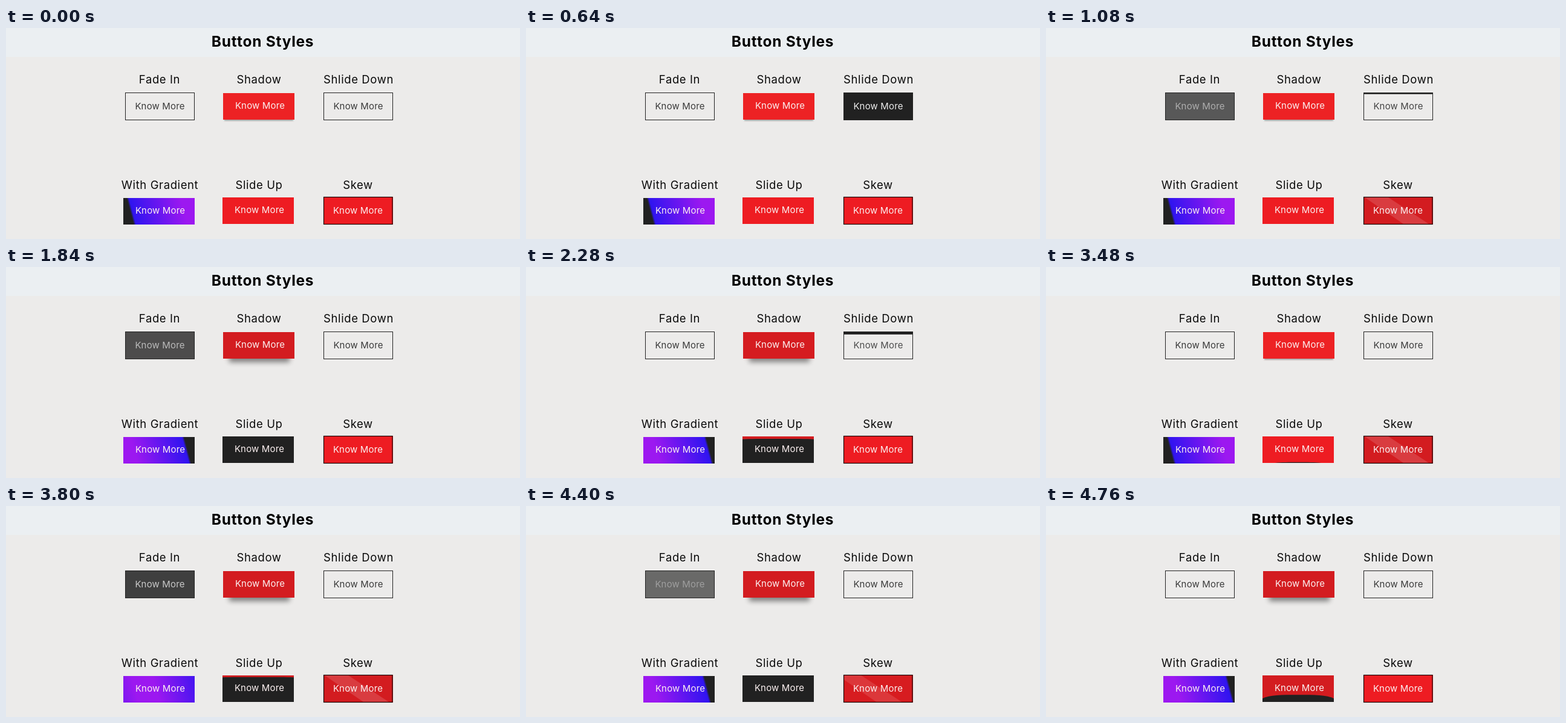
Animation of 850x350 px, one loop 4800 ms. Source, as an HTML page:

```html
<!DOCTYPE html>
<html lang="en">
<head>
<meta charset="utf-8">
<title>Button Styles</title>
<style>
html, body { margin: 0; width: 100%; height: 100%; overflow: hidden; background: #ecebea; }
svg { display: block; width: 850px; height: 350px; }
text { font-family: Inter, "Open Sans", sans-serif; text-anchor: middle; }
.title { font-size: 24.5px; font-weight: 700; letter-spacing: .7px; }
.label { font-size: 18.5px; font-weight: 400; letter-spacing: .6px; fill: #0a0a0a; }
.btn { font-size: 15px; letter-spacing: .15px; fill: #fbf0f0; }
.outline { fill: none; stroke: #222; stroke-width: 1; }
</style>
</head>
<body>
<svg viewBox="0 0 850 350">
  <defs>
    <linearGradient id="glow" gradientUnits="userSpaceOnUse" x1="196.4" y1="335" x2="427.6" y2="273">
      <stop offset=".07" stop-color="#212121"/>
      <stop offset=".085" stop-color="#3014f0"/>
      <stop offset=".43" stop-color="#9c18f0"/>
      <stop offset=".57" stop-color="#9c18f0"/>
      <stop offset=".915" stop-color="#3014f0"/>
      <stop offset=".93" stop-color="#212121"/>
    </linearGradient>
    <clipPath id="gradBox"><rect x="194" y="282" width="118" height="44"/></clipPath>
    <clipPath id="upBox"><rect x="358" y="281" width="118" height="44"/></clipPath>
    <clipPath id="skewBox"><rect x="526" y="281" width="113" height="44"/></clipPath>
    <filter id="soft" x="-20%" y="-60%" width="140%" height="220%"><feGaussianBlur stdDeviation="1.3"/></filter>
    <filter id="wide" x="-20%" y="-60%" width="140%" height="220%"><feGaussianBlur stdDeviation="4"/></filter>
  </defs>

  <rect width="850" height="350" fill="#ecebea"/>
  <rect width="850" height="48" fill="#ebeff2"/>
  <text class="title" x="424.5" y="31">Button Styles</text>

  <text class="label" x="254" y="92">Fade In</text>
  <rect id="fadeFill" x="197" y="107" width="115" height="46" fill="#212121"/>
  <rect class="outline" x="197.5" y="107.5" width="114" height="45"/>
  <text class="btn" id="fadeText" x="254.5" y="135">Know More</text>

  <text class="label" x="418.5" y="92">Shadow</text>
  <rect id="shadeLow" x="361" y="140" width="114" height="14" filter="url(#soft)"/>
  <rect id="shadeHigh" x="369" y="130" width="100" height="28" filter="url(#wide)"/>
  <rect id="shadowFill" x="359" y="108" width="118" height="44"/>
  <text class="btn" x="420" y="134">Know More</text>

  <text class="label" x="583" y="92">Shlide Down</text>
  <rect id="downFill" x="525" y="107" width="115" height="46" fill="#212121"/>
  <rect class="outline" x="525.5" y="107.5" width="114" height="45"/>
  <text class="btn" id="downText" x="582.5" y="135">Know More</text>

  <text class="label" x="254.5" y="267">With Gradient</text>
  <g clip-path="url(#gradBox)">
    <rect id="gradFill" x="194" y="282" width="236" height="44" fill="url(#glow)"/>
  </g>
  <text class="btn" x="255" y="308">Know More</text>

  <text class="label" x="418.5" y="267">Slide Up</text>
  <g clip-path="url(#upBox)">
    <rect id="upBase" x="358" y="281" width="118" height="44"/>
    <path id="upFill" fill="#212121"/>
  </g>
  <text class="btn" x="419" y="307">Know More</text>

  <text class="label" x="582" y="267">Skew</text>
  <rect id="skewFill" x="525" y="280" width="115" height="46"/>
  <g clip-path="url(#skewBox)">
    <path id="stripe" d="M527 281H566L633 325H591Z" fill="#fff"/>
  </g>
  <rect x="525.5" y="280.5" width="113.5" height="45" fill="none" stroke="#1c0505" stroke-width="1.2"/>
  <text class="btn" x="582" y="308">Know More</text>
</svg>
<script>
const LOOP = 4800;
const $ = id => document.getElementById(id);
const set = (id, attrs) => {
  for (const k in attrs) $(id).setAttribute(k, attrs[k]);
};

// Hover windows: rise start, rise end, fall start, fall end (ms)
const hovers = {
  fade: [[820, 1220, 1720, 2120], [3500, 3900, 4240, 4640]],
  shadow: [[1360, 1640, 2240, 2520], [3540, 3760, 4900, 5100]],
  down: [[40, 440, 740, 1140], [2200, 2600, 2860, 3260]],
  grad: [[1240, 1720, 2240, 2660], [3520, 3965, 4712, 5112]],
  up: [[1257, 1700, 2200, 2640], [3437, 3865, 4470, 4910]],
  upTint: [[1300, 1600, 2660, 2860], [3480, 3780, 4930, 5130]],
  skew: [[640, 960, 1380, 1700], [3120, 3440, 4300, 4720]]
};

const ramp = (t, a, b) => {
  const s = Math.min(1, Math.max(0, (t - a) / (b - a)));
  return s * s * (3 - 2 * s);
};
const level = (name, t) => Math.max(...hovers[name].map(([a, b, c, d]) => ramp(t, a, b) - ramp(t, c, d)));
const mix = (from, to, k) => `rgb(${from.map((v, i) => Math.round(v + (to[i] - v) * k))})`;

const INK = [58, 58, 58], PALE = [236, 236, 236];
const RED = [238, 28, 34], DEEP = [211, 28, 32];

function draw(t) {
  const fade = level('fade', t);
  set('fadeFill', { opacity: fade });
  $('fadeText').style.fill = mix(INK, PALE, fade ** 1.3);

  const lift = level('shadow', t);
  set('shadowFill', { fill: mix([237, 34, 36], DEEP, lift) });
  set('shadeLow', { opacity: 0.3 * (1 - lift) });
  set('shadeHigh', { opacity: 0.45 * lift });

  const down = level('down', t);
  set('downFill', { height: 46 * down });
  $('downText').style.fill = mix(INK, PALE, down);

  set('gradFill', { transform: `translate(${-118 * level('grad', t)} 0)` });

  // The rising panel has a domed top that flattens as it fills
  const up = level('up', t);
  const top = 325 - 44 * up, edge = top + 8 * (1 - up);
  set('upBase', { fill: mix(RED, DEEP, level('upTint', t)) });
  set('upFill', {
    d: `M358 ${edge}C370 ${top} 390 ${top} 417 ${top}S464 ${top} 476 ${edge}V334H358Z`,
    opacity: up > 0 ? 1 : 0
  });

  const skew = level('skew', t);
  set('skewFill', { fill: mix(RED, DEEP, skew) });
  set('stripe', { opacity: 0.14 * skew, transform: `translate(${-80 * (1 - skew)} 0)` });
}

function tick(now) {
  draw(now % LOOP);
  requestAnimationFrame(tick);
}
draw(0);
requestAnimationFrame(tick);
</script>
</body>
</html>
```
